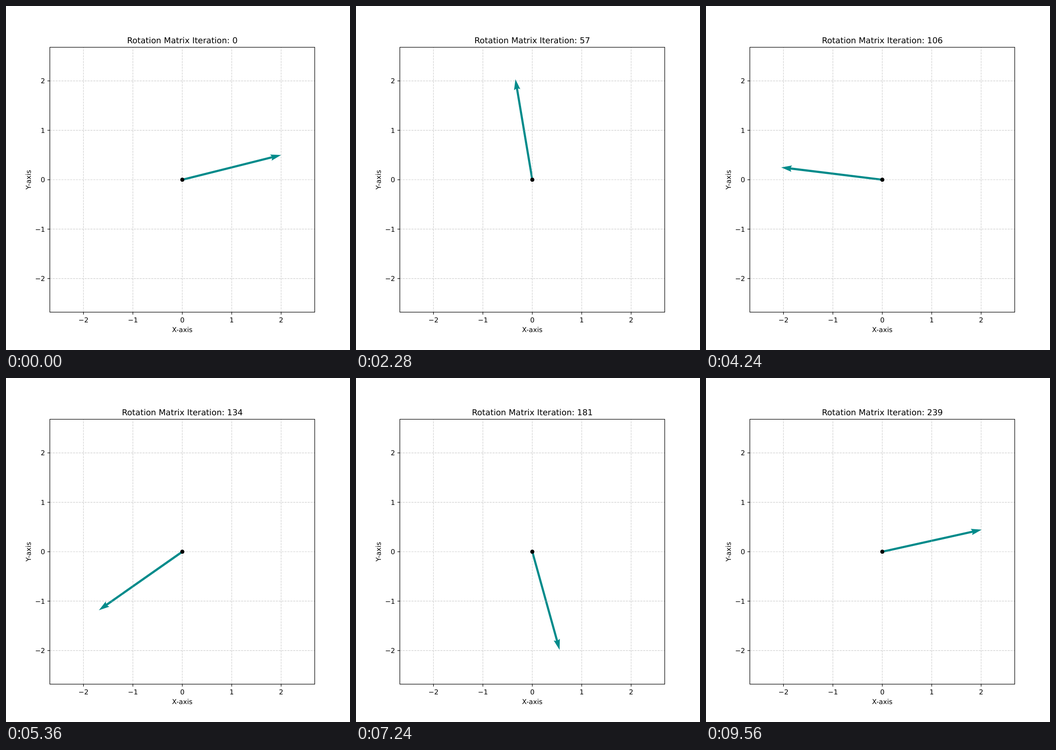
Write an HTML page that moves like this. It is 748 px wide and 748 px high and loops after 9600 ms.

```html
<!DOCTYPE html>
<html lang="en">
<head>
<meta charset="utf-8">
<title>Rotation Matrix</title>
<style>
  html, body { margin: 0; width: 100%; height: 100%; overflow: hidden; background: #fff; }
  svg { display: block; width: 748px; height: 748px; }
  text { font-family: "DejaVu Sans", sans-serif; font-size: 14.84px; text-rendering: geometricPrecision; }
  #title { font-size: 17.81px; }
  .mid { text-anchor: middle; }
  .end { text-anchor: end; }
  .grid { stroke: #b0b0b0; stroke-opacity: .6; stroke-width: 1.19; stroke-dasharray: 4.4 1.9; }
  .tick, .frame { stroke: #000; stroke-width: 1.19; fill: none; }
</style>
</head>
<body>
<svg id="stage" viewBox="0 0 748 748" xmlns="http://www.w3.org/2000/svg">
  <rect width="748" height="748" fill="#fff"/>
</svg>
<script>
const STEP_MS = 40, STEPS = 240;
const CX = 383.35, CY = 377.74, HALF = 287.98;
const LEN = Math.hypot(2, 0.5), START = Math.atan2(0.5, 2);
const UNIT = HALF / (1.3 * LEN);
const W = 4.608; // shaft width
const left = CX - HALF, right = CX + HALF, top_ = CY - HALF, bottom = CY + HALF;
const stage = document.getElementById('stage');

function add(tag, attrs, text) {
  const el = document.createElementNS('http://www.w3.org/2000/svg', tag);
  for (const k in attrs) el.setAttribute(k, attrs[k]);
  if (text !== undefined) el.textContent = text;
  stage.appendChild(el);
  return el;
}

function line(cls, x1, y1, x2, y2) {
  add('line', { class: cls, x1, y1, x2, y2 });
}

// Arrow along +x with its tail at the origin
const tip = LEN * UNIT, back = tip - 5 * W, neck = tip - 4.5 * W;
const half = [[0, W / 2], [neck, W / 2], [back, 1.5 * W]];
const outline = [...half, [tip, 0], ...half.map(([x, y]) => [x, -y]).reverse()];
const arrow = add('polygon', { points: outline.join(' '), fill: '#008b8b' });

for (let k = -2; k <= 2; k++) {
  const x = CX + k * UNIT, y = CY - k * UNIT;
  const label = String(k).replace('-', '\u2212');
  line('grid', x, bottom, x, top_);
  line('grid', left, y, right, y);
  line('tick', x, bottom, x, bottom + 5.19);
  line('tick', left, y, left - 5.19, y);
  add('text', { class: 'mid', x, y: 687.5 }, label);
  add('text', { class: 'end', x: 85, y: y + 5.6 }, label);
}

add('circle', { cx: CX, cy: CY, r: 4.45 });
add('rect', { class: 'frame', x: left, y: top_, width: 2 * HALF, height: 2 * HALF });
add('text', { class: 'mid', x: CX, y: 708.8 }, 'X-axis');
add('text', { class: 'mid', transform: `translate(53.7 ${CY}) rotate(-90)` }, 'Y-axis');
const title = add('text', { id: 'title', class: 'mid', x: CX, y: 80.8 });

function draw(ms) {
  const n = Math.floor(ms / STEP_MS) % STEPS;
  const deg = START * 180 / Math.PI + n * 360 / STEPS;
  arrow.setAttribute('transform', `translate(${CX} ${CY}) rotate(${-deg})`);
  title.textContent = 'Rotation Matrix Iteration: ' + n;
}

function loop(now) {
  draw(Math.max(0, now));
  requestAnimationFrame(loop);
}
draw(0);
requestAnimationFrame(loop);
</script>
</body>
</html>
```
